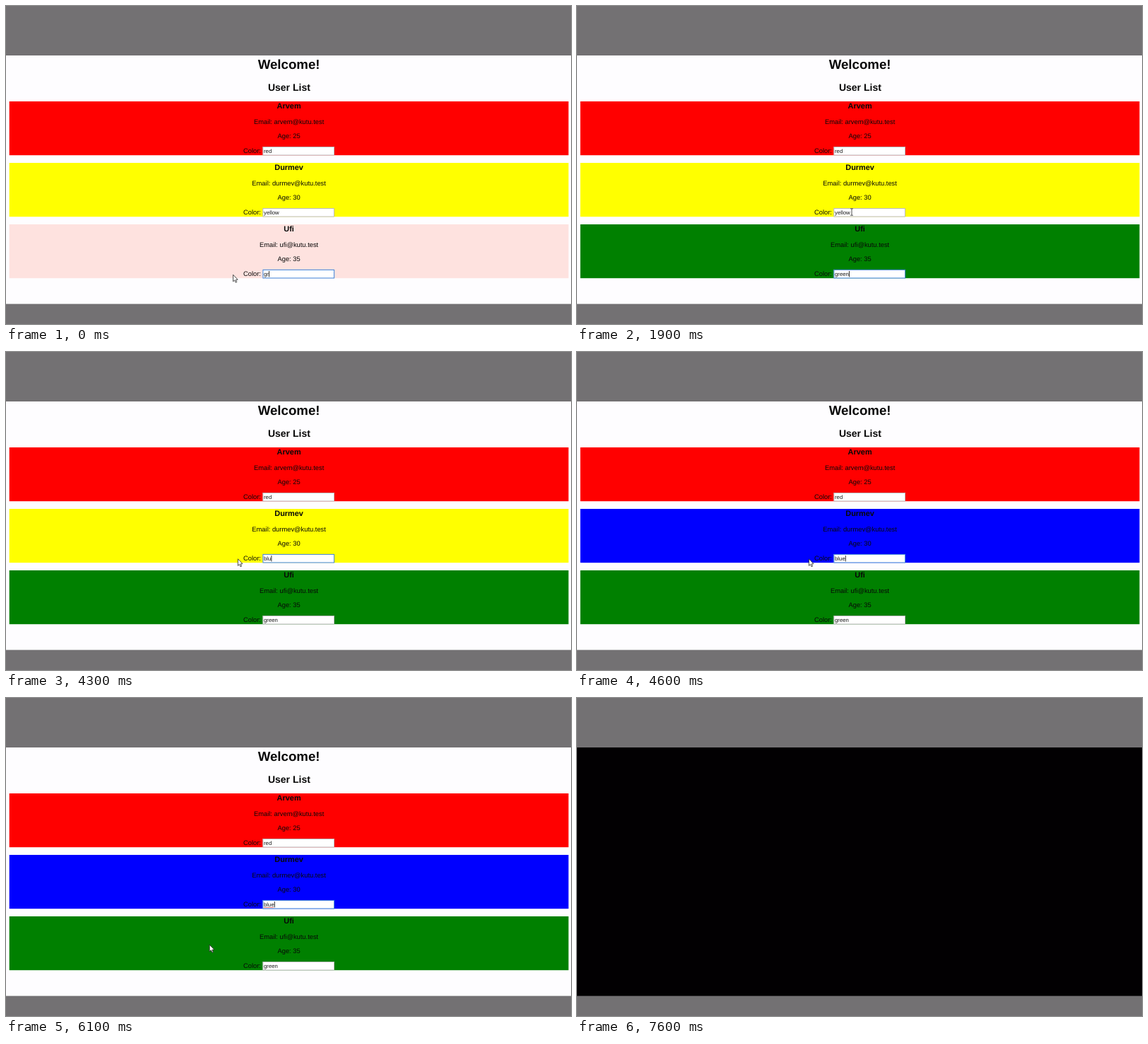
These frames come from a looping animation (800 px wide and 450 px high, 8 s). An HTML page with a canvas:

```html
<!DOCTYPE html>
<html lang="en">
<head>
<meta charset="utf-8">
<title>User List</title>
<style>
  html, body { margin: 0; width: 100%; height: 100%; overflow: hidden; background: #737173; }
  canvas { display: block; width: 800px; height: 450px; }
</style>
</head>
<body>
<canvas id="stage" width="800" height="450"></canvas>
<script>
const ctx = document.getElementById('stage').getContext('2d');
const FONT = '"Liberation Sans", Arial, sans-serif';
const LOOP = 8000, STEP = 100, BLINK = 530;
const MID = 400.6, CARD_TOP = 135, CARD_GAP = 87, CARD_H = 76.2;
const FIELD = { x: 363.5, y: 64, w: 101.5, h: 12, text: 365 };

const USERS = [
  { name: 'Arvem', age: 25 },
  { name: 'Durmev', age: 30 },
  { name: 'Ufi', age: 35 }
];

// Each entry: start time, value
const GREEN_TYPING = [[0, 'gr'], [200, 'gre'], [300, 'gree'], [400, 'green']];
const BLUE_TYPING = [[0, 'yellow'], [3600, ''], [3700, 'b'], [4100, 'bl'], [4300, 'blu'], [4600, 'blue']];

// Pointer path: time, x, y
const POINTER = [
  [0, 321.6, 380.3], [1100, 321.6, 380.3], [1500, 362, 322], [1800, 389, 291.5],
  [2000, 389, 291.5], [2300, 332, 292.5], [2800, 328.4, 292.8], [5500, 328.4, 292.8],
  [6100, 288.2, 349.2], [6300, 261, 395], [LOOP, 261, 395]
];
const POINTER_HIDE = 6900, PRESS = 2000, BLACKOUT = 7600;

function latest(track, t) {
  return track.filter(entry => entry[0] <= t).pop();
}

function pointerAt(t) {
  const i = Math.max(1, POINTER.findIndex(p => p[0] > t));
  const a = POINTER[i - 1], b = POINTER[i];
  const k = (t - a[0]) / (b[0] - a[0]);
  return { x: a[1] + (b[1] - a[1]) * k, y: a[2] + (b[2] - a[2]) * k };
}

function box(color, x, y, w, h) {
  ctx.fillStyle = color;
  ctx.fillRect(x, y, w, h);
}

function setFont(size, weight = 'normal') {
  ctx.font = `${weight} ${size}px ${FONT}`;
}

function label(text, x, y, size, weight, align = 'center', color = '#080808') {
  setFont(size, weight);
  ctx.textAlign = align;
  ctx.fillStyle = color;
  ctx.fillText(text, x, y);
}

function squiggle(x, y, w) {
  ctx.beginPath();
  for (let i = 0; i <= w; i++) ctx.lineTo(x + i, y + (i % 2 ? 0.5 : -0.5));
  ctx.strokeStyle = '#f0605c';
  ctx.lineWidth = 0.8;
  ctx.stroke();
}

function field(top, state) {
  const { x, y, w, h, text: tx } = FIELD;
  const fy = top + y;
  box('#fff', x, fy, w, h);
  ctx.strokeStyle = state.focus ? '#3f82d8' : '#a09fa0';
  ctx.lineWidth = state.focus ? 1 : 0.7;
  ctx.strokeRect(x + 0.4, fy + 0.4, w - 0.8, h - 0.4);

  setFont(7.8);
  const tw = ctx.measureText(state.text).width;
  const sel = tw * state.selected;
  if (sel > 0) box('#2583e4', tx + tw - sel, fy + 1.8, sel, 8.8);
  label(state.text, tx, fy + 8.7, 7.8, 'normal', 'left', '#181818');
  if (sel > 0) {
    ctx.save();
    ctx.beginPath();
    ctx.rect(tx + tw - sel, fy, sel, h);
    ctx.clip();
    label(state.text, tx, fy + 8.7, 7.8, 'normal', 'left', '#fff');
    ctx.restore();
  }
  if (state.misspelt) squiggle(tx, fy + 10.5, tw);
  if (state.caret) box('#000', tx + tw + 0.1, fy + 2, 0.8, 8.4);
}

function card(i, color, state) {
  const top = CARD_TOP + i * CARD_GAP;
  const { name, age } = USERS[i];
  box(color, 4.7, top, 791.8, CARD_H);
  label(name, MID, top + 10.2, 10.93, 'bold');
  label(`Email: ${name.toLowerCase()}@kutu.test`, MID, top + 32.3, 9.35);
  label(`Age: ${age}`, MID, top + 52.2, 9.35);
  label('Color:', 336, top + 72.7, 9.35, 'normal', 'left');
  field(top, state);
}

function arrow({ x, y }) {
  ctx.save();
  ctx.translate(x, y);
  ctx.beginPath();
  [[0, 0], [0, 9.6], [2.2, 7.6], [3.6, 11], [5.2, 10.3], [3.8, 7.1], [6.6, 6.9]]
    .forEach(p => ctx.lineTo(...p));
  ctx.closePath();
  ctx.fillStyle = '#fff';
  ctx.fill();
  ctx.strokeStyle = '#222';
  ctx.lineWidth = 0.8;
  ctx.stroke();
  ctx.restore();
}

function textPointer({ x, y }) {
  box('#222', x - 0.4, y - 4.5, 0.8, 9);
  box('#222', x - 2, y - 5, 4, 0.7);
  box('#222', x - 2, y + 4.3, 4, 0.7);
}

function overField({ x, y }) {
  const row = (y - CARD_TOP) % CARD_GAP;
  return x > FIELD.x && x < FIELD.x + FIELD.w && row > FIELD.y && row < FIELD.y + FIELD.h;
}

function draw(t) {
  box('#737173', 0, 0, 800, 450);
  if (t >= BLACKOUT) {
    box('#020002', 0, 70, 800, 351.6);
    return;
  }
  box('#fefdff', 0, 70, 800, 351.6);
  label('Welcome!', MID, 89.4, 18.7, 'bold');
  label('User List', MID + 0.3, 119.9, 14.02, 'bold');

  const [greenTime, greenText] = latest(GREEN_TYPING, t);
  const [blueTime, blueText] = latest(BLUE_TYPING, t);
  const blink = since => (t - since) % (2 * BLINK) < BLINK;
  const pointer = pointerAt(t);
  const second = t >= PRESS;
  const editing = blueText !== 'yellow';

  setFont(7.8);
  const wordWidth = ctx.measureText('yellow').width;
  const dragged = (FIELD.text + wordWidth - pointer.x) / wordWidth;
  const selected = second && !editing ? Math.min(1, Math.max(0, dragged)) : 0;

  card(0, '#f00', { text: 'red', selected: 0 });
  card(1, blueText === 'blue' ? '#00f' : '#ff0', {
    text: blueText,
    focus: second,
    selected,
    misspelt: (t >= 2300 && !editing) || t >= 5000,
    caret: second && !selected && blink(Math.max(blueTime, PRESS))
  });
  card(2, greenText === 'green' ? '#008000' : '#fee2df', {
    text: greenText,
    focus: !second,
    selected: 0,
    caret: !second && blink(greenTime)
  });

  if (t < POINTER_HIDE) (overField(pointer) ? textPointer : arrow)(pointer);
}

ctx.textRendering = 'geometricPrecision';
const start = performance.now();
function tick() {
  const t = (performance.now() - start) % LOOP;
  draw(Math.floor(t / STEP) * STEP);
  requestAnimationFrame(tick);
}
tick();
</script>
</body>
</html>
```
